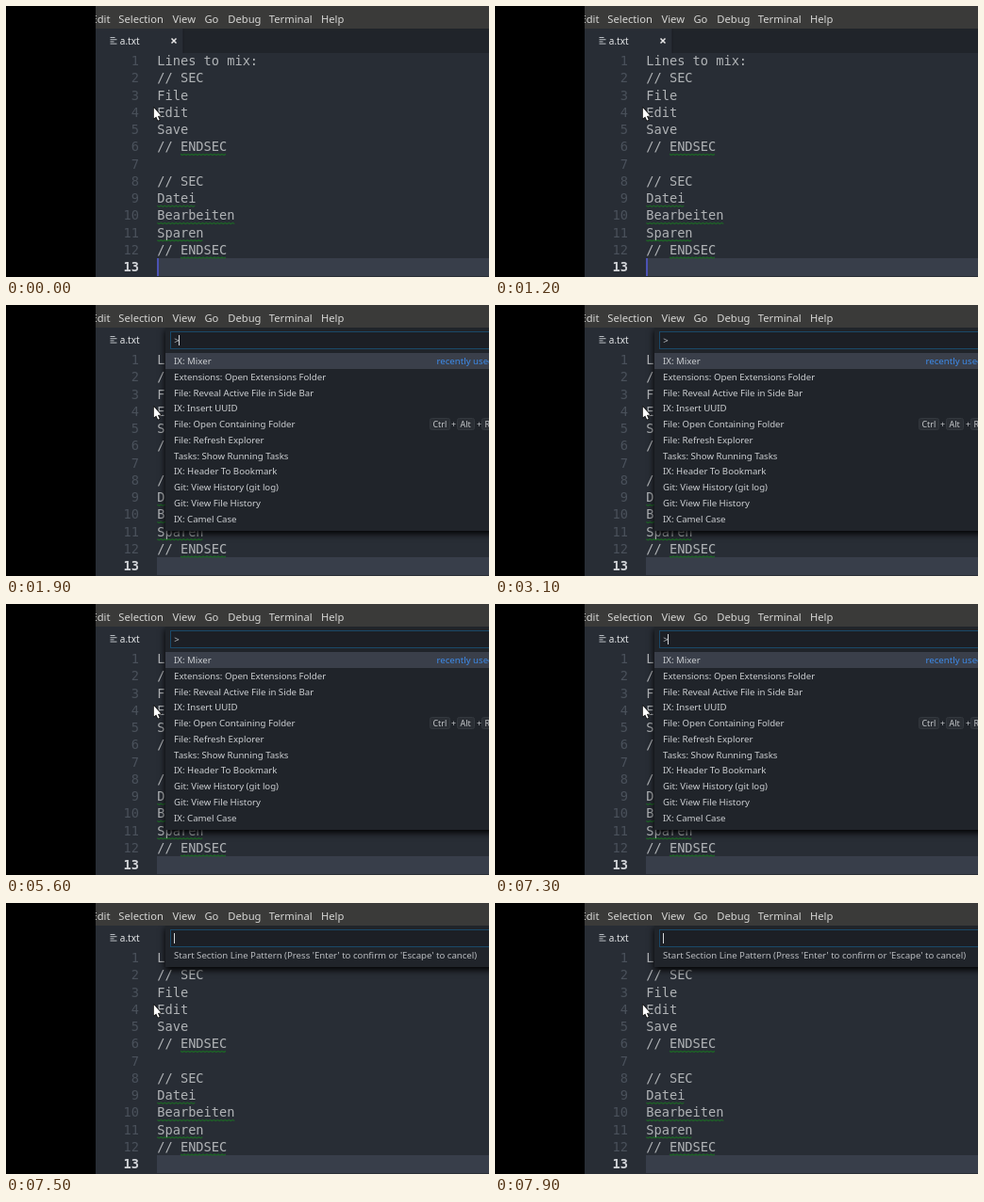
These frames come from a looping animation (512 by 288 pixels, 8000 ms). An HTML page with a canvas:

```html
<!DOCTYPE html>
<html lang="en">
<head>
<meta charset="utf-8">
<title>Editor command palette</title>
<style>
  html, body { margin: 0; width: 100%; height: 100%; overflow: hidden; background: #000; }
  canvas { display: block; width: 512px; height: 288px; }
</style>
</head>
<body>
<canvas id="stage" width="512" height="288"></canvas>
<script>
const ctx = document.getElementById('stage').getContext('2d');
const LOOP = 8000;
const UI = '"Noto Sans", "Open Sans", sans-serif';
const MONO = '13.65px "DejaVu Sans Mono", monospace';
const CHAR = 8.22, ROW = 18.27, TEXT_X = 160.3;

const LINES = ['Lines to mix:', '// SEC', 'File', 'Edit', 'Save', '// ENDSEC', '',
  '// SEC', 'Datei', 'Bearbeiten', 'Sparen', '// ENDSEC', ''];
const MISSPELT = /ENDSEC|Datei|Bearbeiten|Sparen/;
const MENU = [['Edit', 90.5], ['Selection', 119.3], ['View', 176.5], ['Go', 210.4],
  ['Debug', 235.3], ['Terminal', 278.8], ['Help', 334]];
const COMMANDS = ['IX: Mixer', 'Extensions: Open Extensions Folder',
  'File: Reveal Active File in Side Bar', 'IX: Insert UUID', 'File: Open Containing Folder',
  'File: Refresh Explorer', 'Tasks: Show Running Tasks', 'IX: Header To Bookmark',
  'Git: View History (git log)', 'Git: View File History', 'IX: Camel Case'];
const HINT = "Start Section Line Pattern (Press 'Enter' to confirm or 'Escape' to cancel)";

function rect(x, y, w, h, color) {
  ctx.fillStyle = color;
  ctx.fillRect(x, y, w, h);
}

function text(str, x, y, font, color, align = 'left') {
  ctx.font = font;
  ctx.fillStyle = color;
  ctx.textAlign = align;
  ctx.fillText(str, x, y);
}

const ui = (str, x, y, size, color, weight = 400) =>
  text(str, x, y, `${weight} ${size}px ${UI}`, color);

function squiggle(x, y, w) {
  ctx.beginPath();
  for (let i = 0; i <= w; i += 2) ctx.lineTo(x + i, y + (i % 4 ? 0.5 : -0.5));
  ctx.strokeStyle = '#1d6326';
  ctx.lineWidth = 1.3;
  ctx.stroke();
}

function drawEditor(cursor) {
  rect(95, 24, 417, 264, '#282d35');
  rect(160, 268, 352, 19, '#383e4a');
  LINES.forEach((line, i) => {
    const y = 63 + i * ROW, last = i === LINES.length - 1;
    text(i + 1, 141, y, last ? 'bold ' + MONO : MONO, last ? '#d2d4d8' : '#4a515b', 'right');
    text(line, TEXT_X, y, MONO, '#b0b3b6');
    const bad = line.match(MISSPELT);
    if (bad) squiggle(TEXT_X + bad.index * CHAR, y + 3.6, bad[0].length * CHAR);
  });
  if (cursor) rect(160, 268, 2, 19, '#4b52b4');
}

function drawTabs() {
  rect(188, 24, 324, 26, '#20242a');
  rect(187.5, 24, 1, 26, '#1a1d22');
  [5, 7, 4, 7].forEach((w, i) => rect(110.5, 33 + i * 2.2, w, 1, '#b9bdc2'));
  ui('a.txt', 120.8, 40.5, 10, '#e6e8ea', 500);
  ctx.beginPath();
  ctx.moveTo(175.5, 34.5); ctx.lineTo(180.5, 39.5);
  ctx.moveTo(180.5, 34.5); ctx.lineTo(175.5, 39.5);
  ctx.strokeStyle = '#e8e8e8';
  ctx.lineWidth = 1.5;
  ctx.stroke();
}

function drawMenu() {
  rect(95, 0, 417, 24, '#3a3a39');
  for (const [label, x] of MENU) ui(label, x, 17.5, 11.2, '#d6d6d4');
}

function drawPanel(bottom, prompt, caret) {
  ctx.save();
  ctx.shadowColor = '#000';
  ctx.shadowBlur = 7;
  ctx.shadowOffsetY = 3;
  rect(169, 24, 360, bottom - 24, '#20242a');
  ctx.restore();
  rect(174, 28, 350, 19, '#1c1f25');
  ctx.strokeStyle = '#1a4968';
  ctx.lineWidth = 1;
  ctx.strokeRect(174.5, 28.5, 350, 18);
  ui(prompt, 178.2, 41.2, 9.65, '#c4c7ca');
  if (caret) rect(prompt ? 183 : 178, 32, 1, 11, '#d5d7da');
}

function keyCap(label, x, w) {
  ctx.beginPath();
  ctx.roundRect(x + 0.5, 120.5, w, 12, 2);
  ctx.fillStyle = '#2a2e34';
  ctx.fill();
  ctx.strokeStyle = '#33383e';
  ctx.lineWidth = 1;
  ctx.stroke();
  ui(label, x + 3.5, 129.7, 8.9, '#c4c7ca');
}

function drawPalette(caret) {
  drawPanel(240, '>', caret);
  rect(169, 51, 343, 17, '#3a3f4a');
  COMMANDS.forEach((cmd, i) => ui(cmd, 178.1, 63 + i * 16.75, 9.65, '#cccfd2'));
  ui('recently used', 456.5, 63, 9.65, '#3d8bea', 500);
  keyCap('Ctrl', 449, 21);
  ui('+', 472, 130, 8.9, '#c4c7ca');
  keyCap('Alt', 478, 18);
  ui('+', 499, 130, 8.9, '#c4c7ca');
  keyCap('R', 504, 14);
}

function drawPrompt() {
  drawPanel(68, '', true);
  ui(HINT, 178, 59.4, 9.65, '#b9bcc0');
}

function drawPointer() {
  const shape = [[156.8, 108.2], [156.8, 119.6], [159.2, 117.4], [161.1, 121.6],
    [162.7, 120.9], [160.9, 116.9], [164.2, 116.6]];
  ctx.beginPath();
  for (const [x, y] of shape) ctx.lineTo(x, y);
  ctx.closePath();
  ctx.lineJoin = 'round';
  ctx.strokeStyle = '#111';
  ctx.lineWidth = 1.6;
  ctx.stroke();
  ctx.fillStyle = '#fff';
  ctx.fill();
}

const within = (t, spans) => spans.some(([from, to]) => t >= from && t < to);

function draw(t) {
  const palette = within(t, [[1900, 7400]]);
  const prompt = t >= 7500;
  const cursor = within(t, [[0, 300], [1200, 1600], [7400, 7500]]);
  const caret = !within(t, [[3100, 4400], [5600, 6900]]);

  rect(0, 0, 512, 288, '#000');
  ctx.save();
  ctx.beginPath();
  ctx.rect(95, 0, 417, 288);
  ctx.clip();
  drawEditor(cursor);
  drawTabs();
  if (palette) drawPalette(caret);
  if (prompt) drawPrompt();
  drawMenu();
  drawPointer();
  ctx.restore();
}

let start;
function frame(now) {
  start ??= now;
  draw((now - start) % LOOP);
  requestAnimationFrame(frame);
}
draw(0);
requestAnimationFrame(frame);
</script>
</body>
</html>
```
